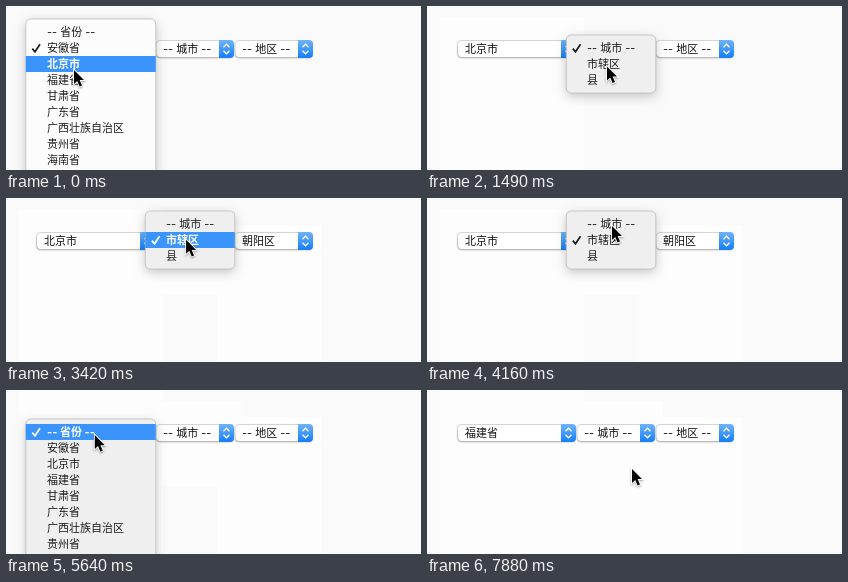
Animation of 415 by 164 pixels, one loop 8000 ms. Source, as an HTML page with a canvas:

```html
<!DOCTYPE html>
<html lang="zh-CN">
<head>
<meta charset="utf-8">
<title>省市区选择</title>
<style>
html, body { margin: 0; width: 100%; height: 100%; overflow: hidden; background: #fafafa; }
canvas { display: block; width: 415px; height: 164px; }
</style>
</head>
<body>
<canvas id="stage"></canvas>
<script>
const W = 415, H = 164, LOOP = 8000, TICK = 148.4, ROW = 16, MID = 42;
const FONT = '11px Inter, "Noto Sans CJK SC", "Noto Sans CJK", sans-serif';
const canvas = document.getElementById('stage');
const ctx = canvas.getContext('2d');
const dpr = window.devicePixelRatio || 1;
canvas.width = W * dpr;
canvas.height = H * dpr;

const prompts = ['-- 省份 --', '-- 城市 --', '-- 地区 --'];
const list = (col, names) => [prompts[col], ...names.split(' ')];
const provinces = list(0, '安徽省 北京市 福建省 甘肃省 广东省 广西壮族自治区 贵州省 海南省 河北省 河南省 黑龙江省');
const beijing = list(1, '市辖区 县');
const fujian = list(1, '福州市 厦门市 莆田市 三明市 泉州市 漳州市 南平市 龙岩市 宁德市');
const areas = list(2, '东城区 西城区 朝阳区 丰台区 石景山区 海淀区 门头沟区 房山区 通州区');

const selects = [{ x: 30, w: 119 }, { x: 149.5, w: 78.5 }, { x: 228.5, w: 78.5 }];

// Each visit opens a menu, glides from its select to an option and picks it.
const visits = [
  { col: 0, open: -5, close: 2, from: 68, to: [68, 64], items: provinces, pick: '北京市', fill: '#fcfcfc' },
  { col: 1, open: 7, close: 11, from: 178, to: [180, 60.5], items: beijing, pick: '市辖区' },
  { col: 2, open: 14, close: 18, from: 250, to: [253, 91], items: areas, pick: '朝阳区' },
  { col: 1, open: 23, close: 29, from: 180, to: [185, 28], items: beijing, pick: prompts[1] },
  { col: 0, open: 31, close: 36, from: 87, to: [88, 17], items: provinces, pick: prompts[0] },
  { col: 0, open: 38, close: 43, from: 89, to: [86, 88], items: provinces, pick: '福建省' },
  { col: 1, open: 46, close: 53, from: 184, to: [205, 79], items: fujian, pick: '厦门市' }
];

// A pick shows one tick after its menu closes and resets the selects after it.
function valuesAt(n) {
  const values = ['安徽省', prompts[1], prompts[2]];
  for (const { col, close, pick } of visits) {
    if (n <= close) break;
    values.splice(col, 3, pick, ...prompts.slice(col + 1));
  }
  return values;
}

for (const v of visits) {
  const s = selects[v.col];
  v.checked = v.items.indexOf(valuesAt(v.open)[v.col]);
  v.x = s.x - 10.2;
  v.w = s.w + 11;
  v.top = MID - 13 - v.checked * ROW;
  v.h = v.items.length * ROW + 10;
}

const ease = k => k < 0.5 ? 16 * k ** 5 : 1 - 16 * (1 - k) ** 5;

function glide(a, b, t0, t1, n) {
  const k = ease(Math.min(1, Math.max(0, (n - t0) / (t1 - t0))));
  return a.map((p, i) => p + (b[i] - p) * k);
}

function pointerAt(n) {
  const i = visits.findIndex(v => n < v.close);
  if (i < 0) return visits[visits.length - 1].to;
  const v = visits[i], prev = visits[i - 1];
  const start = [v.from, MID], arrive = v.open - 1;
  return n < arrive
    ? glide(prev.to, start, prev.close, arrive, n)
    : glide(start, v.to, arrive, v.close - 3, n);
}

function box(x, y, w, h, r) {
  ctx.beginPath();
  ctx.roundRect(x, y, w, h, r);
}

function shadow(alpha, blur, dy) {
  ctx.shadowColor = `rgba(0,0,0,${alpha})`;
  ctx.shadowBlur = blur * dpr;
  ctx.shadowOffsetY = dy * dpr;
}

function line(points, color, width) {
  ctx.beginPath();
  points.forEach(([x, y]) => ctx.lineTo(x, y));
  ctx.strokeStyle = color;
  ctx.lineWidth = width;
  ctx.stroke();
}

function gradient(top, bottom) {
  const g = ctx.createLinearGradient(0, 34, 0, 52);
  g.addColorStop(0, top);
  g.addColorStop(1, bottom);
  return g;
}

function label(text, x, y, color, weight = '') {
  ctx.font = weight + ' ' + FONT;
  ctx.fillStyle = color;
  ctx.fillText(text, x, y + 4);
}

function drawSelect({ x, w }, value) {
  const right = x + w, c = right - 7.5;
  ctx.save();
  shadow(0.25, 1.5, 0.7);
  box(x + 0.5, 34.5, w - 1, 17, 4);
  ctx.fillStyle = '#fff';
  ctx.fill();
  ctx.restore();
  ctx.strokeStyle = gradient('#d4d4d4', '#b8b8b8');
  ctx.lineWidth = 1;
  ctx.stroke();

  box(right - 15, 34, 15, 18, [0, 4, 4, 0]);
  ctx.fillStyle = gradient('#6fb4fa', '#157efb');
  ctx.fill();
  for (const d of [-1, 1]) {
    const y = 43 + d * 1.7;
    line([[c - 3, y], [c, y + d * 3], [c + 3, y]], '#fff', 1.4);
  }
  label(value, Math.round(x + 7.5), 43, '#111');
}

function drawMenu({ x, w, top, h, col, close, checked, items, fill = '#efefef' }, n, pointerY) {
  ctx.save();
  shadow(0.22, 11, 3.5);
  box(x, top, w, h, 5);
  ctx.fillStyle = fill;
  ctx.fill();
  ctx.restore();
  ctx.strokeStyle = '#bdbdbd';
  ctx.lineWidth = 0.8;
  ctx.stroke();

  // The highlight blinks off just before the menu closes.
  const blink = n === close - 1 || (close === 2 && n === 1);
  const hot = blinkOff(n, close) ? -1 : Math.floor((pointerY - top - 5) / ROW);
  items.forEach((text, i) => {
    const y = top + 5 + i * ROW, on = i === hot;
    const color = on ? '#fff' : '#1c1c1c';
    if (on) {
      ctx.fillStyle = '#3a94fc';
      ctx.fillRect(x, y, w, ROW);
    }
    if (i === checked) {
      line([[x + 6.5, y + 8.6], [x + 9.2, y + 11.8], [x + 14.2, y + 4.2]], color, 1.7);
    }
    label(text, Math.floor(selects[col].x + 11), y + 8, color, on ? 'bold' : '');
  });
}

function blinkOff(n, close) {
  return n === close - 1;
}

function drawPointer([x, y]) {
  ctx.save();
  ctx.translate(x, y);
  shadow(0.35, 2, 1);
  ctx.beginPath();
  [[0, 0], [0, 14], [3.2, 11], [5.6, 16.6], [8, 15.6], [5.6, 10.1], [10, 10.1]]
    .forEach(p => ctx.lineTo(...p));
  ctx.closePath();
  ctx.strokeStyle = '#fff';
  ctx.lineWidth = 1.8;
  ctx.stroke();
  ctx.shadowColor = 'transparent';
  ctx.fillStyle = '#000';
  ctx.fill();
  ctx.restore();
}

function draw(time) {
  const n = Math.floor((time % LOOP + 8) / TICK);
  const pointer = pointerAt(n), values = valuesAt(n);
  ctx.setTransform(dpr, 0, 0, dpr, 0, 0);
  ctx.fillStyle = '#fafafa';
  ctx.fillRect(0, 0, W, H);

  // Closed menus leave a slightly lighter area behind.
  ctx.fillStyle = '#fdfdfd';
  for (const { x, top, w, h, close } of visits) {
    if (n >= close) ctx.fillRect(Math.round(x - 7), top - 2, Math.round(w + 14), h + 12);
  }

  selects.forEach((s, i) => drawSelect(s, values[i]));
  const menu = visits.find(v => n >= v.open && n < v.close);
  if (menu) drawMenu(menu, n, pointer[1]);
  drawPointer(pointer);
}

const start = performance.now();
function loop() {
  draw(performance.now() - start);
  requestAnimationFrame(loop);
}
loop();
</script>
</body>
</html>
```
